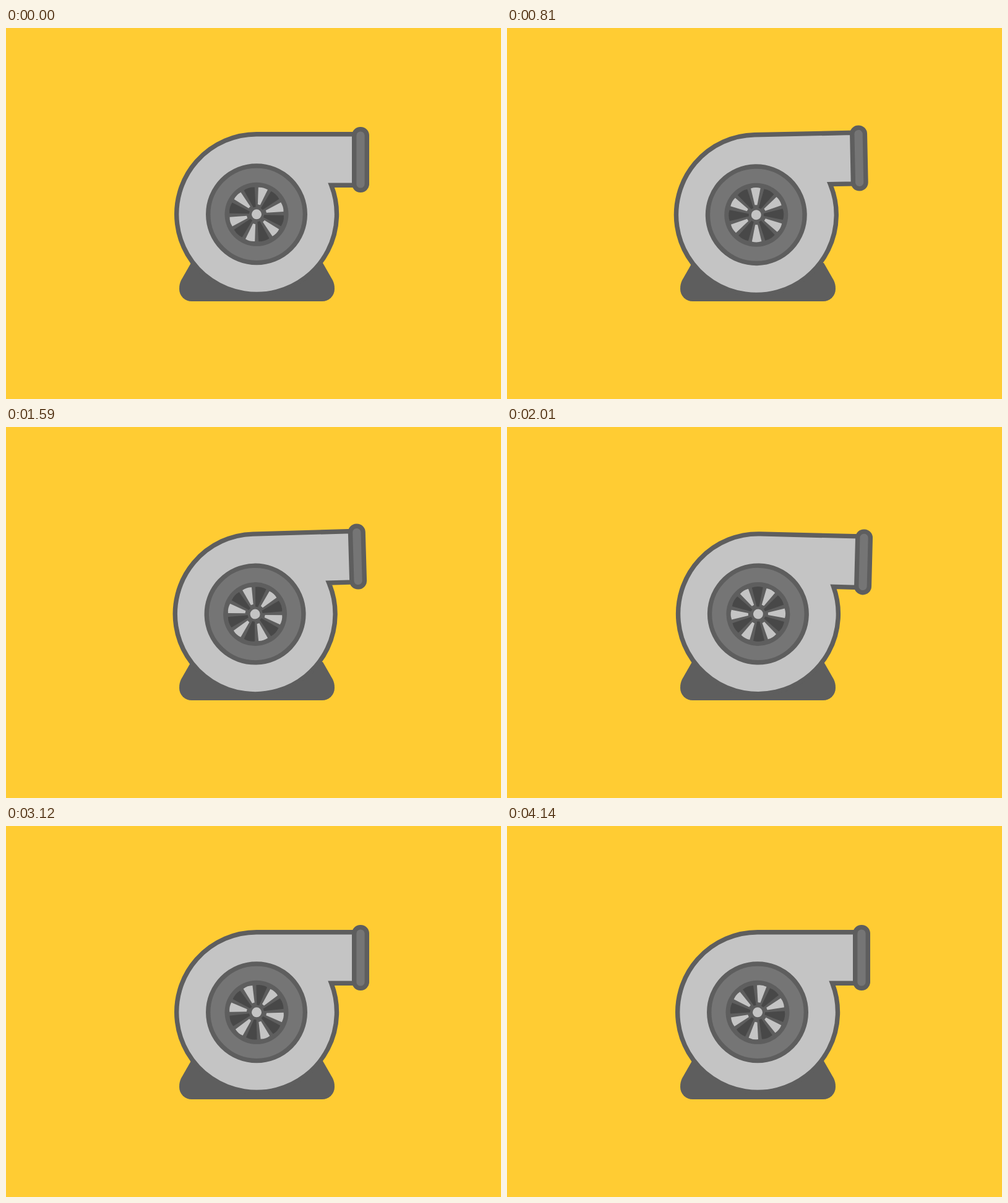
An HTML page that plays this animation: 800 by 600 pixels, repeating every 4170 ms.

```html
<!DOCTYPE html>
<html lang="en">
<head>
<meta charset="utf-8">
<title>Turbocharger</title>
<style>
  html, body { margin: 0; width: 100%; height: 100%; overflow: hidden; background: #ffcc33; }
  svg { display: block; width: 800px; height: 600px; }
  .dark { fill: #5e5e5e; }
  .mid { fill: #757575; }
  .light { fill: #c4c4c4; }
  .deep { fill: #484848; }
  .line { stroke: #5e5e5e; stroke-width: 7.4; }
</style>
</head>
<body>
<svg viewBox="0 0 800 600">
  <path class="dark" d="M299 380 L283 408 Q280 414 280 422 A20 20 0 0 0 300 442 H511 A20 20 0 0 0 531 422 Q531 414 528 408 L512 380 Z"/>
  <g id="turbo">
    <path class="light line" d="M405 171.7 H564 V254.2 H525.7 A129.4 129.4 0 1 1 405 171.7 Z"/>
    <rect class="mid line" x="562.7" y="163.7" width="20.6" height="98.6" rx="10"/>
    <circle class="mid line" cx="405" cy="301.3" r="78.3"/>
    <circle class="dark" cx="405" cy="301.3" r="51.5"/>
    <g id="fan"></g>
    <circle class="light" cx="405" cy="301.3" r="8"/>
  </g>
</svg>
<script>
const LOOP = 4170, STEP = 30;
const turbo = document.getElementById('turbo');
const fan = document.getElementById('fan');

// [time, value] keys: body tilt and fan angle in degrees, body shift in pixels
const tiltKeys = [[0, 0], [420, 0], [1110, -2], [1530, -2], [1860, 2], [2290, 0], [LOOP, 0]];
const shiftKeys = [[0, 0], [420, 0], [1000, -3], [1530, -3], [1830, 2.5], [2130, 0], [LOOP, 0]];
const spinKeys = [[0, 14], [810, 180], [1170, 301], [2010, 627], [2610, 781.5], [3120, 881], [4140, 1029], [LOOP, 1034]];

const linear = p => p;
const smooth = p => p * p * (3 - 2 * p);

function valueAt(keys, t, ease) {
  const i = keys.findIndex(k => k[0] > t);
  const [t0, a] = keys[i - 1], [t1, b] = keys[i];
  return a + (b - a) * ease((t - t0) / (t1 - t0));
}

function blade(angle, shade, d) {
  return `<path class="${shade}" transform="rotate(${angle})" d="${d}"/>`;
}

for (let a = 0; a < 360; a += 60) {
  fan.innerHTML +=
    blade(a + 30, 'deep', 'M-2 -12 L-9 -43 Q0 -46 9 -43 L2 -12 Z') +
    blade(a, 'light', 'M-2 -16 L-7.8 -43 Q0 -45.5 7.8 -43 L2 -16 Z');
}

function draw(now) {
  const t = Math.floor(now % LOOP / STEP) * STEP;
  const tilt = valueAt(tiltKeys, t, smooth);
  const dx = valueAt(shiftKeys, t, smooth), dy = 0.8 * Math.abs(tilt);
  turbo.setAttribute('transform', `translate(${dx} ${dy}) rotate(${tilt} 405 301.3)`);
  fan.setAttribute('transform', `translate(405 301.3) rotate(${valueAt(spinKeys, t, linear)})`);
}

const start = performance.now();
function tick() {
  draw(performance.now() - start);
  requestAnimationFrame(tick);
}
tick();
</script>
</body>
</html>
```
